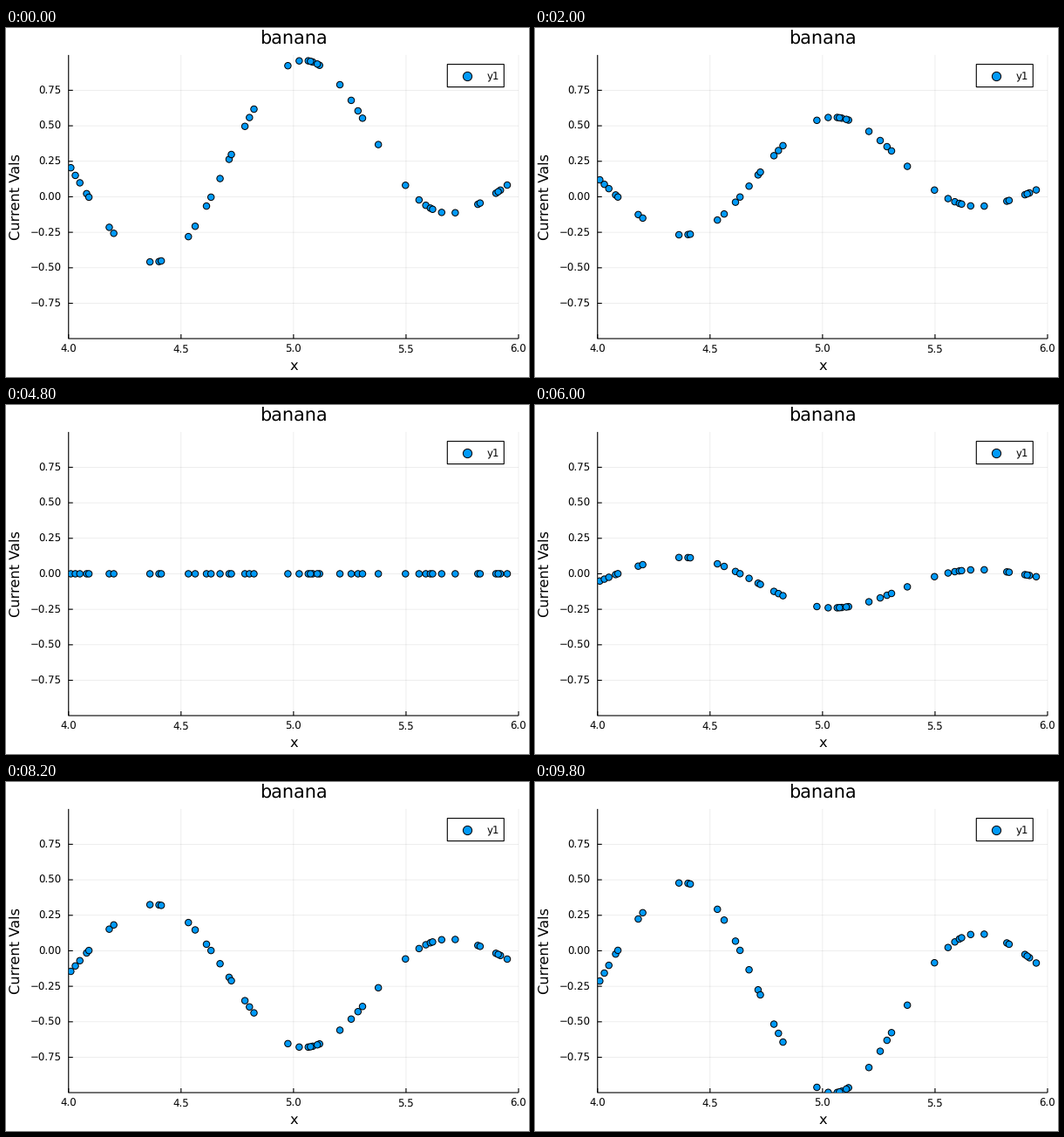
Write a matplotlib script that moves like this. It is 600x400 px and loops after 10 s.

```python
import numpy as np
import matplotlib.pyplot as plt
from matplotlib.animation import FuncAnimation
from matplotlib.patches import Rectangle

W, H, DPI = 600, 400, 100
FRAMES, INTERVAL = 50, 200
LEFT, RIGHT, TOP, BOTTOM = 71.75, 588, 30.9, 356
X_MIN, X_MAX, Y_MAX = 4, 6, 0.9988
BLUE = "#009AF9"

plt.rcParams["font.family"] = "DejaVu Sans"
plt.rcParams["text.hinting"] = "none"

# Random picks from a 200-step grid over the x range, in drawing order.
PICKS = np.array([
    1, 3, 5, 8, 9, 18, 20, 36, 40, 41, 53, 56, 61, 63, 67, 71, 72, 78, 80, 82,
    97, 102, 106, 108, 107, 111, 110, 120, 125, 128, 130, 137, 149, 155, 158,
    160, 161, 165, 171, 181, 182, 189, 191, 190, 194])

# The wave is the polynomial through a few key points.
KEY_STEPS = [1, 8, 20, 40, 61, 82, 110, 137, 155, 171, 189, 194]
KEY_VALS = [0.213, 0.023, -0.268, -0.475, -0.068, 0.643,
            0.974, 0.383, -0.023, -0.117, 0.026, 0.086]
wave = np.polynomial.Polynomial.fit(KEY_STEPS, KEY_VALS, len(KEY_STEPS) - 1)

x = np.linspace(X_MIN, X_MAX, 200)[PICKS]
y = wave(PICKS)


def pt(px):
    return px * 72 / DPI


def to_px(v, lo, hi, start, end):
    return start + (v - lo) / (hi - lo) * (end - start)


def line(xs, ys, width=1.1, **kw):
    stage.plot(xs, ys, color="black", linewidth=pt(width), snap=False,
               solid_capstyle="butt", **kw)


def label(px, py, text, size, **kw):
    kw = {"ha": "center", "va": "baseline", **kw}
    stage.text(px, py, text, fontsize=pt(size), **kw)


def circles(axes, xs, ys, size):
    # One size per point keeps the centres off the pixel grid.
    return axes.scatter(xs, ys, s=np.full(len(xs), pt(size) ** 2), color=BLUE,
                        edgecolors="black", linewidths=pt(1))


fig = plt.figure(figsize=(W / DPI, H / DPI), dpi=DPI, facecolor="white")

# Static parts, laid out in stage pixels.
stage = fig.add_axes([0, 0, 1, 1])
stage.axis("off")

for v in np.arange(4, 6.1, 0.5):
    px = to_px(v, X_MIN, X_MAX, LEFT, RIGHT)
    line([px, px], [TOP, BOTTOM], 0.65, alpha=0.1)
    line([px, px], [BOTTOM, BOTTOM - 5])
    label(px, 372, f"{v:.1f}", 11.8)
for v in np.arange(-0.75, 0.8, 0.25):
    py = to_px(v, -Y_MAX, Y_MAX, BOTTOM, TOP)
    line([LEFT, RIGHT], [py, py], 0.65, alpha=0.1)
    line([LEFT, LEFT + 5], [py, py])
    label(63.8, py + 4.2, f"{v:.2f}".replace("-", "\u2212"), 11.8, ha="right")
line([LEFT, LEFT, RIGHT], [TOP, BOTTOM, BOTTOM])

label(330, 18.3, "banana", 20.8)
label(330, 391.6, "x", 16.2)
label(19.2, 193, "Current Vals", 16.2, rotation=90, ha="right", va="center")

stage.add_patch(Rectangle((506.3, 41.6), 65, 26, facecolor="white", snap=False,
                          edgecolor="black", linewidth=pt(1.1), zorder=3))
circles(stage, [529.2], [54.5], 10.2).set_zorder(4)
label(551.2, 59, "y1", 11.8, ha="left", zorder=4)
stage.set_xlim(0, W)
stage.set_ylim(H, 0)

plot = fig.add_axes([LEFT / W, 1 - BOTTOM / H,
                     (RIGHT - LEFT) / W, (BOTTOM - TOP) / H])
plot.axis("off")
dots = circles(plot, x, y, 7.4)
plot.set_xlim(X_MIN, X_MAX)
plot.set_ylim(-Y_MAX, Y_MAX)


def draw(i):
    dots.set_offsets(np.column_stack([x, y * (0.96 - 0.04 * i)]))
    return dots,


anim = FuncAnimation(fig, draw, frames=FRAMES, interval=INTERVAL,
                     repeat=True, repeat_delay=0)
plt.show()
```
